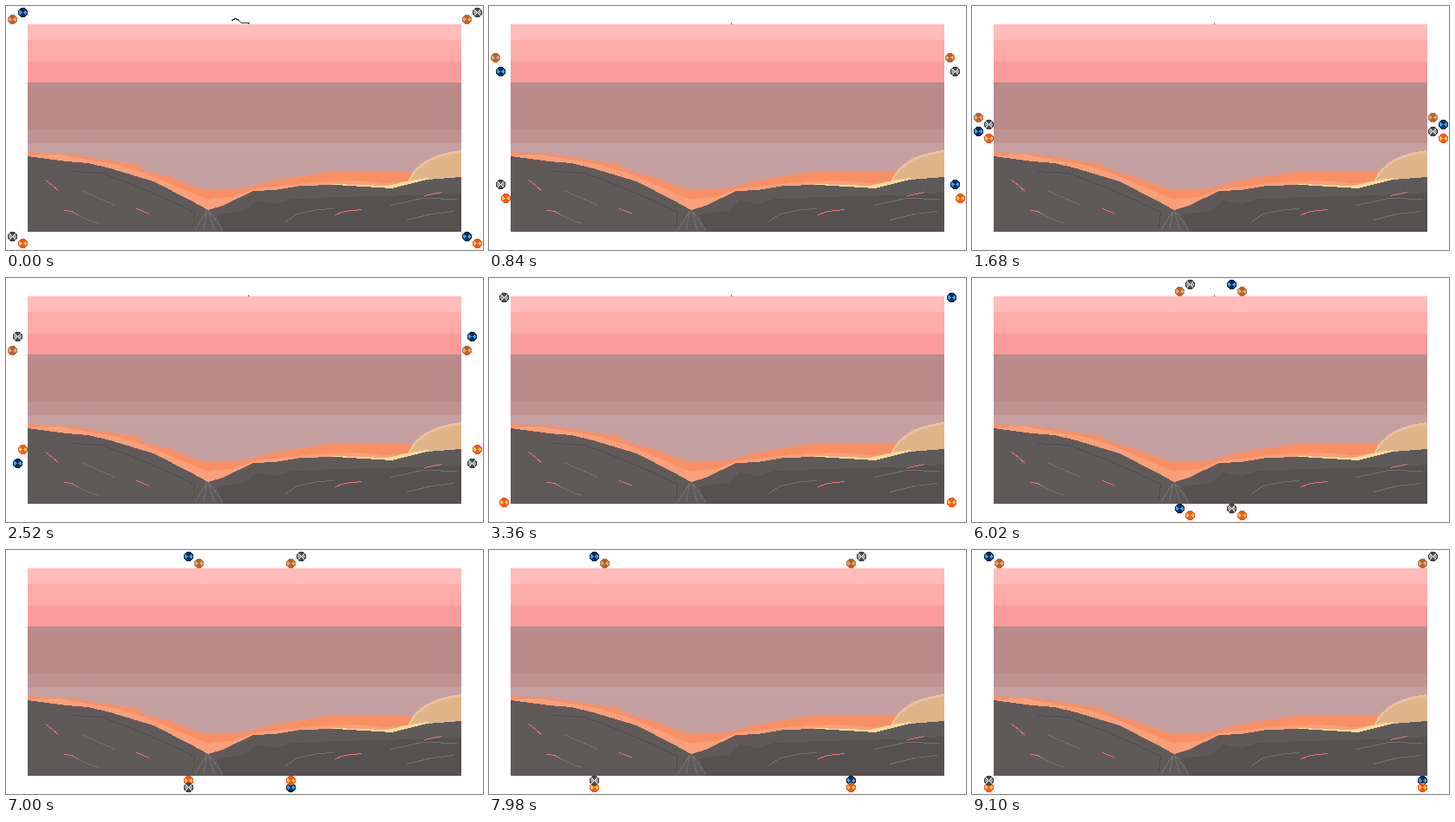
These frames come from a looping animation (550x281 px, 9.24 s). An HTML page:

```html
<!DOCTYPE html>
<html lang="en">
<head>
<meta charset="utf-8">
<title>Desert dusk</title>
<style>
  html, body { margin: 0; width: 100%; height: 100%; overflow: hidden; background: #fff; }
  svg { display: block; width: 100vw; height: 100vh; shape-rendering: crispEdges; }
  .line { fill: none; stroke-width: 1; transform: translate(.5px, .5px); }
</style>
</head>
<body>
<svg viewBox="0 0 550 281">
  <g id="sky"></g>

  <path fill="#f99065" d="M25 168 75 171 100 175 128 179 148 182 164 191 190 197 212 206 230 212 265 211 285 207 300 203 320 199 340 196 365 192 376 190 455 191 468 191V215H340L233 240 25 200Z"/>
  <path fill="#fb9f78" d="M25 172 60 171 100 178 130 183 165 194 200 209 230 222 262 220 285 211 320 207 350 203 400 201 440 204 468 201V215H340L233 240 25 200Z"/>
  <path fill="#e8c3a0" d="M462 206Q472 172 525 166V202Z"/>
  <path fill="#e0b488" d="M464 206Q476 174 525 169V202Z"/>
  <path fill="#fbdc98" d="M376 205 440 207 466 201 485 198 490 201 445 212 376 208Z"/>

  <path fill="#5f5a5a" d="M25 173 70 179 95 181 120 187 170 202 215 225 233 235 250 230 285 213 310 212 340 207 380 206 445 210 485 200 525 197V260H25Z"/>
  <path fill="#545150" d="M242 240 275 236 290 224 310 228 330 222 380 220 430 219 470 218 525 215V260H250Z"/>

  <path class="line" stroke="#504b4b" d="M75 190 110 192 150 207 185 222 215 236M217 236 215 255"/>
  <path class="line" stroke="#777171" d="M88 213 125 229M82 240 97 247 107 250M231 236 217 258M231 236 227 258M233 236 240 258M234 236 250 258M322 248 335 239 360 234 378 233M443 229 480 221 520 222M462 246 490 239 517 236"/>
  <path class="line" stroke="#fb716c" d="M45 200 53 206 61 213M67 235 75 236 82 240M150 233 165 239M379 240 390 236 410 234M482 218 502 214"/>

  <rect id="speck" x="279" y="20" width="1" height="1" fill="#222"/>
  <path id="bird" class="line" stroke="#333" d="M260 16 264 14 268 16 271 19H280"/>
  <g id="balls"></g>
</svg>

<script>
const STEP = 140, STEPS = 66, TURN = 24;
const CENTER_X = 275, CENTER_Y = 140;
const NS = "http://www.w3.org/2000/svg";
const byId = id => document.getElementById(id);
const clamp = (value, limit) => Math.max(-limit, Math.min(limit, value));

function add(parent, tag, attributes) {
  const node = parent.appendChild(document.createElementNS(NS, tag));
  for (const name in attributes) node.setAttribute(name, attributes[name]);
  return node;
}

[[21, "#ffbcbb"], [39, "#ffabaa"], [64, "#fc9b9b"], [88, "#b98a89"], [142, "#be9392"], [158, "#c5a0a1"]]
  .forEach(([y, fill]) => add(byId("sky"), "rect", { x: 25, y, width: 500, height: 260 - y, fill }));

const looks = {
  tan:  { rim: "#b9744b", body: "#e8a066", core: "#b5622c" },
  blue: { rim: "#0a2548", body: "#29a5f5", core: "#0b2a5a" },
  gray: { rim: "#3a3a3a", body: "#a0a0a0", core: "#4c4c4c", cross: "#f2f2f2" },
  fire: { rim: "#e8552d", body: "#ffc032", core: "#ec5a24" }
};

// Starting corner, the lane taken along the side, and who runs ahead along top and bottom.
const balls = [
  { look: "tan",  side: -1, level: -1, outer: true,  leads: false },
  { look: "blue", side: -1, level: -1, outer: true,  leads: false },
  { look: "gray", side: -1, level: 1,  outer: false, leads: true },
  { look: "fire", side: -1, level: 1,  outer: false, leads: true },
  { look: "tan",  side: 1,  level: -1, outer: false, leads: false },
  { look: "gray", side: 1,  level: -1, outer: false, leads: true },
  { look: "blue", side: 1,  level: 1,  outer: true,  leads: true },
  { look: "fire", side: 1,  level: 1,  outer: true,  leads: false }
];

function makeBall(look) {
  const { rim, body, core, cross } = looks[look];
  const ball = add(byId("balls"), "g", {});
  const disc = (radius, fill) => add(ball, "circle", { cx: .5, cy: .5, r: radius, fill });
  disc(5.5, rim);
  disc(4.5, body);
  add(ball, "path", { fill: core, d: "M-3-3H-2V-4H3V-3H4L1 .5 4 4H3V5H-2V4H-3L0 .5Z" });
  if (cross) add(ball, "path", { stroke: cross, "stroke-width": 1.4, d: "M-3-3 4 4M4-3-3 4" });
  return ball;
}

// Balls of two looks pass through the meeting point; the others bounce back from it.
function place({ look, side, level, outer, leads }, t) {
  const passes = look === "blue" || look === "gray";
  const meet = way => passes ? way : Math.abs(way);

  const rise = level * meet(12 - 11.5 * (t - 12) - (passes ? 16 : 0));
  const swapped = Math.abs(t - 50) < 6;
  const far = rise > 0 ? passes === swapped : passes;
  const lane = far ? 133 : 125;
  const dy = clamp(rise, t < 12 ? lane : Math.min(lane, 118 + 3 * (t - TURN)));

  const weave = passes ? -Math.cos(Math.PI * t / 12) : 1;
  const run = clamp(188 - 12.7 * (t - 31) - (leads ? 12 : 0), 258);
  const dx = side * (t < TURN ? 262 + (outer ? 6 : -6) * weave : meet(run));

  return [CENTER_X + dx, CENTER_Y + dy].map(Math.round);
}

for (const ball of balls) ball.node = makeBall(ball.look);

function draw(now) {
  const step = Math.floor(now / STEP) % STEPS;
  for (const ball of balls) ball.node.setAttribute("transform", `translate(${place(ball, step)})`);
  byId("bird").style.display = step ? "none" : "";
  byId("speck").style.display = step < 48 ? "" : "none";
}

let start;
function tick(now) {
  start ??= now;
  draw(now - start);
  requestAnimationFrame(tick);
}
draw(0);
requestAnimationFrame(tick);
</script>
</body>
</html>
```
